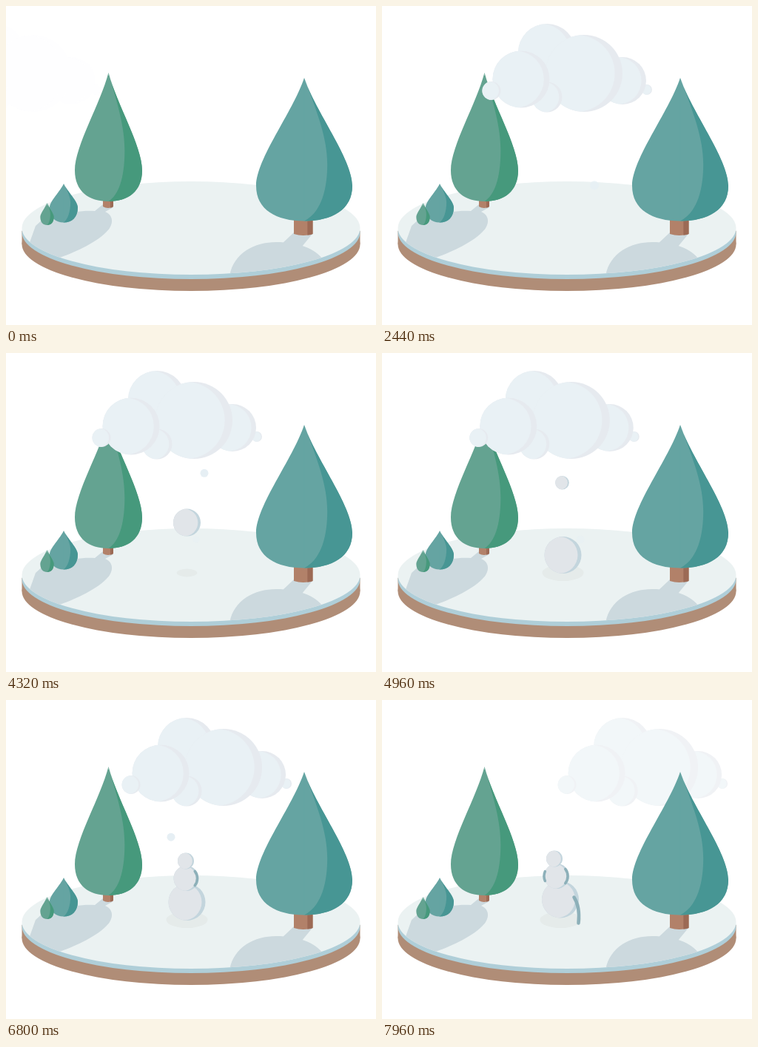
Animation, 500 px wide and 431 px high, one loop 8000 ms. Source, as an HTML page with a canvas:

```html
<!DOCTYPE html>
<html lang="en">
<head>
<meta charset="utf-8">
<title>Winter island</title>
<style>
html, body { margin: 0; width: 100%; height: 100%; overflow: hidden; background: #fff; }
canvas { display: block; width: 500px; height: 431px; }
</style>
</head>
<body>
<canvas id="stage" width="500" height="431"></canvas>
<script>
const ctx = document.getElementById('stage').getContext('2d');
const LOOP = 8000;
const GREEN = ['#64a391', '#46997c'];
const TEAL = ['#65a4a2', '#479694'];
const SNOW = ['#e1e5e9', '#c3d5dd'];

const clamp = v => Math.max(0, Math.min(1, v));
const ramp = (t, from, to) => clamp((t - from) / (to - from));
const ease = k => k * k * (3 - 2 * k);

// Smooth curve through [time, value] points.
function track(points, t) {
  const last = points.length - 1;
  if (t <= points[0][0]) return points[0][1];
  if (t >= points[last][0]) return points[last][1];
  const i = points.findIndex(p => p[0] > t) - 1;
  const slope = k => {
    const a = points[Math.max(0, k - 1)], b = points[Math.min(last, k + 1)];
    return (b[1] - a[1]) / (b[0] - a[0]);
  };
  const [t0, v0] = points[i], [t1, v1] = points[i + 1];
  const d = t1 - t0, s = (t - t0) / d, e = ease(s);
  return v0 + (v1 - v0) * e + d * s * (1 - s) * ((1 - s) * slope(i) - s * slope(i + 1));
}

function fillPath(d, color) {
  ctx.fillStyle = color;
  ctx.fill(new Path2D(d));
}

function ellipse(x, y, rx, ry, color) {
  ctx.beginPath();
  ctx.ellipse(x, y, rx, ry, 0, 0, 2 * Math.PI);
  ctx.fillStyle = color;
  ctx.fill();
}

function sphere(x, y, r, [light, shade]) {
  ctx.save();
  ellipse(x, y, r, r, shade);
  ctx.clip();
  ellipse(x - r * 0.2, y, r, r, light);
  ctx.restore();
}

function tree(x, top, half, waist, bottom, [light, shade]) {
  const h = waist - top, b = bottom - waist;
  const side = s => `C${x + s * half * 0.24} ${top + h * 0.32} ${x + s * half} ${top + h * 0.75} ${x + s * half} ${waist}` +
    `C${x + s * half} ${waist + b * 0.68} ${x + s * half * 0.58} ${bottom} ${x} ${bottom}`;
  const start = `M${x} ${top}`;
  const inner = `C${x + half * 0.28} ${top + h * 0.33} ${x + half * 0.48} ${top + h * 0.56} ${x + half * 0.48} ${top + h * 0.8}` +
    `C${x + half * 0.48} ${waist + b * 0.25} ${x + half * 0.3} ${waist + b * 0.8} ${x} ${bottom}`;
  fillPath(start + side(-1) + 'Z', light);
  fillPath(start + side(1) + 'Z', light);
  fillPath(`M${x - 0.5} ${top + 4}H${x + 0.5}V${bottom}H${x - 0.5}Z`, light);
  // Outer edge one way and inner edge the other leave only the shaded band.
  ctx.fillStyle = shade;
  ctx.fill(new Path2D(start + side(1) + 'Z' + start + inner + 'Z'), 'evenodd');
}

function trunk(x, y, w, h) {
  fillPath(`M${x} ${y}h${w}v${h - 2}q${-w / 2} 4 ${-w} 0Z`, '#b28169');
  fillPath(`M${x + w * 0.72} ${y}h${w * 0.28}v${h - 2}q${-w * 0.14} 1.5 ${-w * 0.28} 1.5Z`, '#9c6a55');
}

function island() {
  ellipse(250, 322, 228.5, 63, '#b08d77');
  ctx.fillRect(21.5, 304, 457, 18);
  ellipse(250, 306, 228.5, 63, '#afced8');
  ctx.save();
  ellipse(250, 300, 228.5, 63, '#ebf2f2');
  ctx.clip();
  fillPath('M131 268L145 272L134 278C146 283 146 296 135 306C120 321 90 334 70 341L30 325L40 297L50 288L70 286C90 277 108 276 120 277Z', '#ccd9de');
  fillPath('M302 366C306 335 335 319 365 319C395 319 418 328 428 342V370ZM389 306L414 308L400 325L372 322Z', '#ccd9de');
  ctx.restore();
}

const cloudPath = [[0, -236], [1120, -105], [1680, -41], [2100, -8], [2480, 1], [3360, -9],
  [4320, -18], [5000, -16], [5680, -10], [6300, 3], [6800, 22], [7560, 74], [7960, 103], [8000, 106]];
const puffs = [[357, 113, 7], [324, 101, 32], [222, 63, 39], [272, 91, 52],
  [222, 123, 20.5], [187, 99, 38.5], [147, 114.5, 12.5]];

function cloud(t) {
  const k = Math.min(0.04 + 0.96 * ramp(t, 0, 2200), 1 - 0.42 * ramp(t, 7000, 8000));
  const tint = rgb => `rgb(${rgb.map(c => 255 - (255 - c) * k)})`;
  const colors = [tint([233, 241, 245]), tint(t < 1400 ? [233, 240, 244] : [230, 234, 239])];
  const dx = track(cloudPath, t);
  for (const [x, y, r] of puffs) sphere(x + dx, y, r, colors);
}

// x, radius, start time
const flakes = [[287, 6, 1640], [243, 5, 2560], [257, 4.5, 3450],
  [268, 5.5, 4090], [254, 7.5, 5366], [223, 5.5, 6407]];

function snowfall(t) {
  for (const [x, r, start] of flakes) {
    const y = 130 + (t - start) * 0.14;
    if (t < start || y > 265) continue;
    ctx.globalAlpha = 1 - ramp(y, 235, 265);
    ellipse(x, y, r, r, '#e6eff4');
    ctx.globalAlpha = 1;
  }
}

// Falling balls: path of y, path of radius, x, lean
const balls = [
  { x: 244.5, y: [[3330, 130], [4320, 229], [4760, 273]], r: [[3330, 5], [4320, 18.5], [4760, 25]], lean: [-3.5, -3.5] },
  { x: 243.5, y: [[4500, 130], [5100, 190], [5500, 241]], r: [[4500, 4], [5100, 11], [5500, 17]], lean: [-7.5, -3] },
  { x: 243, y: [[4950, 130], [5680, 195], [5950, 217.5]], r: [[4950, 4], [5680, 8.5], [5950, 11]], lean: [-10, -3] }
];

function stroke(path, width, grow, length) {
  if (grow <= 0) return;
  ctx.strokeStyle = '#8db0b9';
  ctx.lineWidth = width;
  ctx.lineCap = 'round';
  ctx.setLineDash([length * grow, 200]);
  ctx.stroke(path);
  ctx.setLineDash([]);
}

function arm(x, y, r, middle, spread, grow) {
  if (grow <= 0) return;
  const path = new Path2D();
  path.arc(x, y, r, middle - spread * grow, middle + spread * grow);
  stroke(path, 3.5, 1, 100);
}

function snowman(t) {
  const lean = ease(ramp(t, 7000, 7960));
  const size = ease(ramp(t, 3850, 4800));
  if (size) ellipse(244.5 - 3 * lean, 297, 28 * size, 11 * size, '#e5ebea');
  const [body, chest] = balls.map(b => {
    const pose = { x: b.x + b.lean[0] * lean, y: track(b.y, t) + b.lean[1] * lean, r: track(b.r, t) };
    if (t >= b.y[0][0]) sphere(pose.x, pose.y, pose.r, SNOW);
    return pose;
  });
  arm(chest.x - 1, chest.y, 16, 0, 0.65, ramp(t, 6400, 6800));
  arm(chest.x - 1, chest.y, 16, Math.PI, 0.42, ramp(t, 7250, 7700));
  const path = new Path2D(`M${body.x + 18.5} ${body.y - 3}Q${body.x + 27} ${body.y + 10} ${body.x + 24.5} ${body.y + 32}`);
  stroke(path, 4.5, ease(ramp(t, 7560, 7900)), 42);
}

function draw(now) {
  const t = now % LOOP;
  ctx.fillStyle = '#fff';
  ctx.fillRect(0, 0, 500, 431);
  island();
  trunk(131, 260, 14, 13);
  tree(138.5, 90, 45.5, 222, 264, GREEN);
  tree(78, 240, 19, 272, 292.5, TEAL);
  tree(55.5, 266, 9.2, 285, 296, GREEN);
  snowman(t);
  snowfall(t);
  cloud(t);
  trunk(389, 286, 25.5, 24);
  tree(403, 97, 65, 243, 290.5, TEAL);
  requestAnimationFrame(() => draw(performance.now()));
}

draw(performance.now());
</script>
</body>
</html>
```
